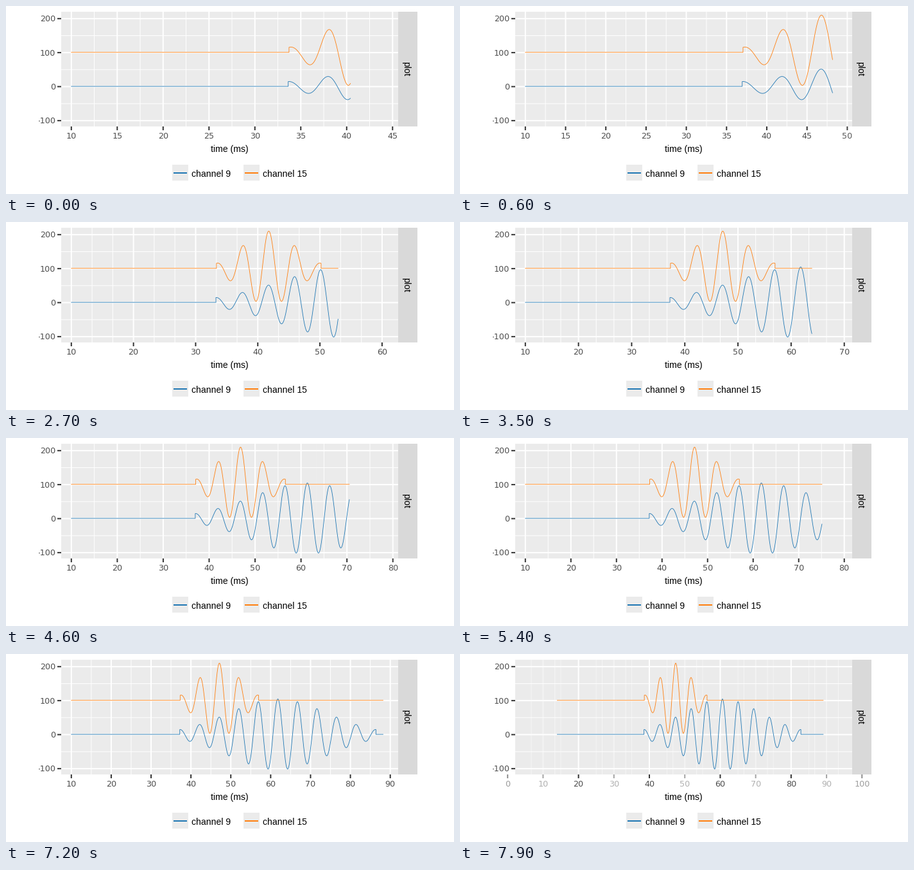
A matplotlib script for the animation above (8 s loop, 698 by 295 pixels).

```python
import matplotlib.pyplot as plt
import numpy as np
from matplotlib.animation import FuncAnimation
from matplotlib.collections import LineCollection
from matplotlib.patches import Rectangle

W, H = 698, 295
STEP, FRAMES = 100, 80
PT = 72 / 100
LEFT, RIGHT, TOP, BOTTOM = 86, 611, 9, 189
X0, X1 = 101.8, 598.7
BLUE, ORANGE = "#1f77b4", "#ff7f0e"
NUMS, SANS = "DejaVu Sans", "Liberation Sans"

# Each view: start ms, easing ms, domain low, domain high, last tick, tick step
VIEWS = [
    (-1000, 500, 10, 44.75, 45, 5),
    (0, 800, 10, 50, 50, 5),
    (850, 588, 10, 60, 60, 10),
    (2550, 444, 10, 70, 70, 10),
    (4400, 260, 10, 80, 80, 10),
    (6100, 825, 10, 90, 90, 10),
    (7430, 905, 0, 100, 100, 20),
]
# How far the stream has been received: ms of playback -> ms of signal
CLOCK = [0, 850, 1200, 2400, 2500, 2600, 2700, 3500, 4400, 5400, 6100, 6500, 7430, 7900]
HEAD = [45, 50, 52.05, 59.6, 59.6, 60.02, 60.18, 63.9, 70, 75.1, 80, 82.7, 90, 93.4]
PERIOD = 4.92

fig = plt.figure(figsize=(W / 100, H / 100), dpi=100, facecolor="white")
ax = fig.add_axes([0, 0, 1, 1])
ax.set_xlim(0, W)
ax.set_ylim(H, 0)
ax.axis("off")


def box(x, y, w, h, color):
    patch = Rectangle((x, y), w, h, fc=color, lw=0, zorder=0)
    return ax.add_patch(patch)


def label(x, y, s, color="black", **kw):
    return ax.text(x, y, s, family=SANS, fontsize=14 * PT, color=color, **kw)


def tick_label(x, y, s, **kw):
    text = ax.text(x, y, s, family=NUMS, fontsize=12.7 * PT, color="#4d4d4d",
                   clip_on=True, **kw)
    text.set_clip_path(frame_clip)
    return text


def rules(segments, width, color, alphas=1, clip=None):
    lines = LineCollection(segments, linewidths=width * PT, colors=color,
                           alpha=alphas, zorder=1, capstyle="butt", snap=False)
    ax.add_collection(lines, autolim=False)
    if clip is not None:
        lines.set_clip_path(clip)
    return lines


def y_px(v):
    return 126.5 - 0.5335 * v


def x_px(v, view):
    lo, hi = view[2:4]
    return X0 + (v - lo) / (hi - lo) * (X1 - X0)


def ease(u):
    u = min(max(u, 0), 1)
    return 4 * u ** 3 if u < 0.5 else 1 - 4 * (1 - u) ** 3


def majors(view):
    return [float(v) for v in range(view[2], view[4] + 1, view[5])]


def minors(view):
    ticks = majors(view)
    parts = 3 if len(ticks) <= 7 else 2
    count = (len(ticks) - 1) * parts
    return [round(view[2] + i * view[5] / parts, 3)
            for i in range(count + 1) if i % parts]


def blend(old, new, p, values):
    """Position and opacity of every mark while one view turns into the next."""
    before, after = set(values(old)), set(values(new))
    marks = []
    for v in sorted(before | after):
        x = (1 - p) * x_px(v, old) + p * x_px(v, new)
        alpha = 1 if v in before & after else p if v in after else 1 - p
        if alpha > 0.01:
            marks.append((v, x, alpha))
    return marks


def burst(cycles, start, amp, base):
    """Gaussian tone burst with flat line on both sides."""
    end = start + cycles * PERIOD
    inner = np.linspace(start, end, 90 * cycles)
    n = (inner - start) / PERIOD - cycles / 2
    wave = amp * np.exp(-0.5 * (n / (cycles / 4)) ** 2) * np.cos(2 * np.pi * n)
    t = np.concatenate([[10, start], inner, [end, 120]])
    v = np.concatenate([[0, 0], wave, [0, 0]]) + base
    return t, v


SIGNALS = [(burst(10, 37.2, 104, 0), BLUE), (burst(4, 37.3, 109.5, 100), ORANGE)]

# Fixed parts
panel = box(LEFT, TOP, RIGHT - LEFT, BOTTOM - TOP, "#ebebeb")
box(RIGHT, TOP, 30, BOTTOM - TOP, "#d9d9d9")
label(622.7, 98.3, "plot", rotation=270, ha="center", va="center")
label(348.5, 229, "time (ms)", ha="center")
frame_clip = Rectangle((51, 0), 600, H, transform=ax.transData)

for v in (-50, 50, 150):
    rules([[(LEFT, y_px(v)), (RIGHT, y_px(v))]], 1, "white")
for v in (-100, 0, 100, 200):
    y = y_px(v)
    rules([[(LEFT, y), (RIGHT, y)]], 2, "white")
    rules([[(80, y), (LEFT, y)]], 2, "#333333")
    tick_label(77, y + 4.5, str(v), ha="right")

for x, color, name in ((259, BLUE, "channel 9"), (370, ORANGE, "channel 15")):
    box(x, 249, 25, 25, "#ebebeb")
    rules([[(x + 2, 262), (x + 23, 262)]], 2, color)
    label(x + 30, 268, name)

curves = [ax.plot([], [], color=c, lw=0.85 * PT, zorder=3)[0] for _, c in SIGNALS]
for curve in curves:
    curve.set_clip_path(panel)
live = []


def grid(marks, width):
    segs = [[(x, TOP), (x, BOTTOM)] for _, x, _ in marks]
    live.append(rules(segs, width, "white", [a for *_, a in marks], panel))


def draw(i):
    while live:
        live.pop().remove()
    t = i * STEP
    k = max(n for n, view in enumerate(VIEWS) if view[0] <= t)
    old, new = VIEWS[k - 1], VIEWS[k]
    p = ease((t - new[0]) / new[1])

    ticks = blend(old, new, p, majors)
    grid(blend(old, new, p, minors), 1)
    grid(ticks, 2)
    for v, x, alpha in ticks:
        live.append(rules([[(x, BOTTOM), (x, BOTTOM + 6)]], 2, "#333333", alpha, frame_clip))
        live.append(tick_label(x, 208, f"{v:.0f}", ha="center", alpha=alpha))

    # The curves take the new scale at once; only the axis eases
    head = np.interp(t, CLOCK, HEAD)
    for curve, ((ts, vs), _) in zip(curves, SIGNALS):
        seen = ts <= head
        tx = np.append(ts[seen], head)
        ty = np.append(vs[seen], np.interp(head, ts, vs))
        curve.set_data(x_px(tx, new), y_px(ty) - 0.4)
    return curves


anim = FuncAnimation(fig, draw, frames=FRAMES, interval=STEP, repeat=True,
                     repeat_delay=0, blit=False)
plt.show()
```
